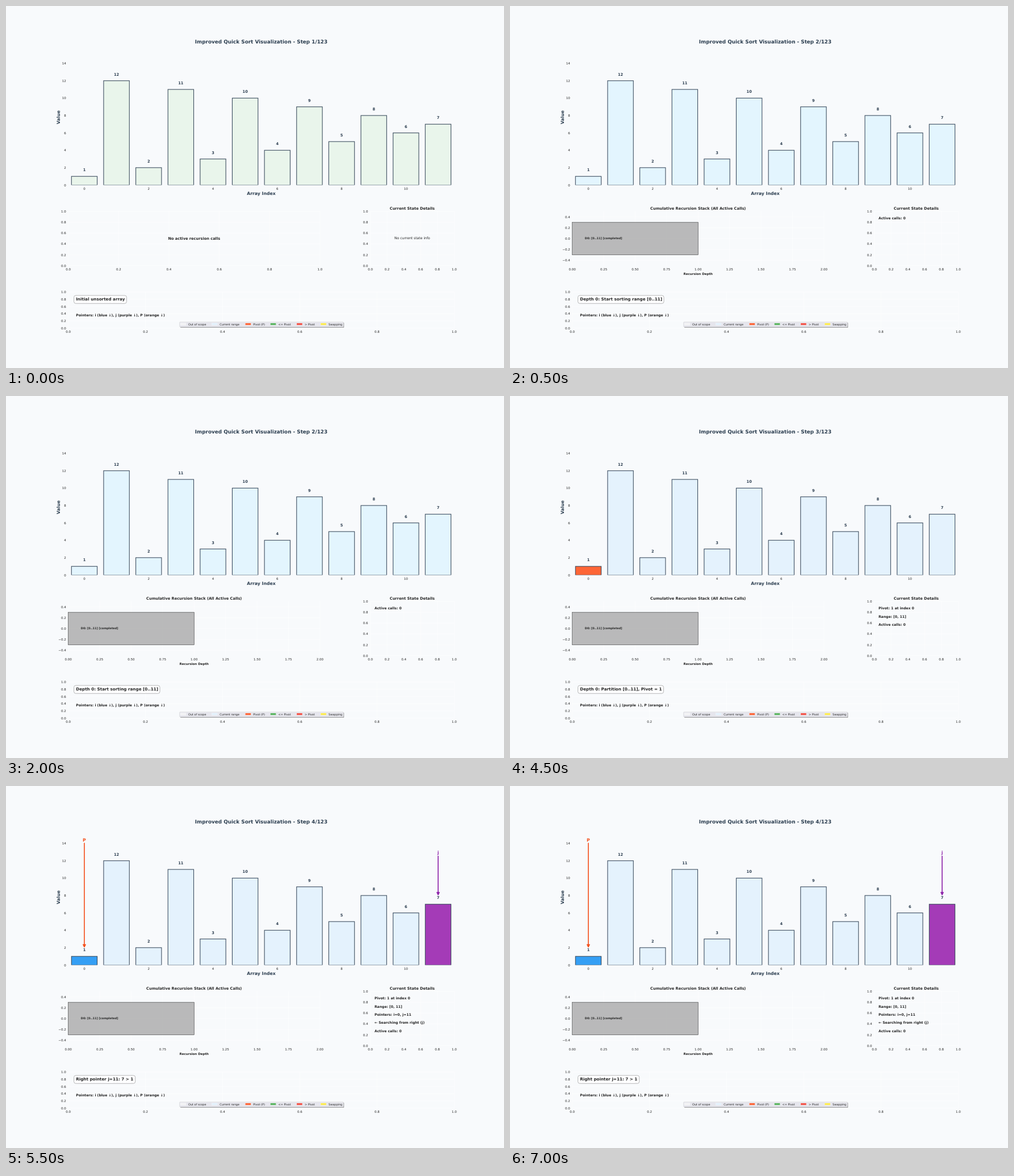
An HTML page that plays this animation: 877x638 px, repeating every 8000 ms.

```html
<!DOCTYPE html>
<html lang="en">
<head>
<meta charset="utf-8">
<title>Quick sort steps</title>
<style>
  html, body { margin: 0; width: 100%; height: 100%; overflow: hidden; background: #f8fafc; }
  svg { display: block; width: 877px; height: 638px; }
  text { font-family: "DejaVu Sans", sans-serif; fill: #262626; text-rendering: geometricPrecision; white-space: pre; }
</style>
</head>
<body>
<svg id="stage" viewBox="0 0 877 638" xmlns="http://www.w3.org/2000/svg"></svg>
<script>
const PT = 877 / 22 / 72;
const LOOP = 8000;
const INK = '#2c3e50';
const values = [1, 12, 2, 11, 3, 10, 4, 9, 5, 8, 6, 7];

// Plot areas
const main = { x: 109.63, y: 76.56, w: 679.67, h: 239 };
const stack = { x: 109.63, y: 362.02, w: 443.27, h: 95.6 };
const state = { x: 641.54, y: 362.02, w: 147.76, h: 95.6 };
const info = { x: 109.63, y: 504.09, w: 679.67, h: 63.73 };
const unitY = main.h / 15.6, unitX = main.w / 12;
const barX = i => main.x + (i + 0.5) * unitX;
const barY = v => main.y + main.h - v * unitY;

const steps = [
  { at: 0, bar: '#e8f5e9', message: 'Initial unsorted array', boxEnd: 212.4 },
  { at: 500, bar: '#e1f5fe', message: 'Depth 0: Start sorting range [0..11]', boxEnd: 271,
    details: [] },
  { at: 3000, bar: '#e3f2fd', message: 'Depth 0: Partition [0..11], Pivot = 1', boxEnd: 270.5,
    marked: { 0: '#ff5722' },
    details: ['Pivot: 1 at index 0', 'Range: [0, 11]'] },
  { at: 5500, bar: '#e3f2fd', message: 'Right pointer j=11: 7 > 1', boxEnd: 227.7,
    marked: { 0: '#2196f3', 11: '#9c27b0' },
    details: ['Pivot: 1 at index 0', 'Range: [0, 11]', 'Pointers: i=0, j=11', '← Searching from right (j)'],
    pointers: [
      { name: 'P', index: 0, base: 98, from: 100.2, tip: 284.8, color: '#f4511e' },
      { name: 'j', index: 11, base: 120.2, from: 123, tip: 192.8, color: '#8e24aa' }
    ] }
];

const svg = document.getElementById('stage');

function add(parent, tag, attrs, content) {
  const el = document.createElementNS('http://www.w3.org/2000/svg', tag);
  for (const key in attrs) el.setAttribute(key, attrs[key]);
  if (content !== undefined) el.textContent = content;
  parent.appendChild(el);
  return el;
}

function label(parent, str, x, y, size, attrs) {
  return add(parent, 'text', { x, y, 'font-size': size * PT, ...attrs }, str);
}

const bold = { 'font-weight': 700 };
const mid = { 'text-anchor': 'middle' };
const boldMid = { ...bold, ...mid };
const heading = { ...boldMid, style: 'fill:' + INK };

const xTick = (g, str, x, bottom) => label(g, str, x, bottom + 8.1, 10, mid);
const yTick = (g, str, y) => (x => label(g, str, x - 3.9, y + 2.02, 10, { 'text-anchor': 'end' }));

// Ticks with white grid lines; each axis is { n, lo, hi, from, step, digits }
function grid(g, box, xs, ys) {
  const line = d => add(g, 'path', { d, stroke: '#fff', 'stroke-width': PT, fill: 'none' });
  const tick = (a, i) => {
    const v = a.from + i * a.step;
    return { str: v.toFixed(a.digits).replace('-', '−'), k: (v - a.lo) / (a.hi - a.lo) };
  };
  for (let i = 0; i < xs.n; i++) {
    const { str, k } = tick(xs, i), x = box.x + k * box.w;
    line(`M${x} ${box.y}v${box.h}`);
    xTick(g, str, x, box.y + box.h);
  }
  for (let i = 0; i < ys.n; i++) {
    const { str, k } = tick(ys, i), y = box.y + (1 - k) * box.h;
    line(`M${box.x} ${y}h${box.w}`);
    yTick(g, str, y)(box.x);
  }
}

const unit = { n: 6, lo: 0, hi: 1, from: 0, step: 0.2, digits: 1 };
const depth = { n: 9, lo: 0, hi: 2, from: 0, step: 0.25, digits: 2 };
const level = { n: 5, lo: -0.5, hi: 0.5, from: -0.4, step: 0.2, digits: 1 };

function drawMain(g, s, n) {
  label(g, `Improved Quick Sort Visualization - Step ${n + 1}/123`, 449.46, 65.5, 16, heading);
  const bars = add(g, 'g', { 'clip-path': 'url(#plot)' });
  values.forEach((v, i) => {
    add(bars, 'rect', {
      x: barX(i) - 0.4 * unitX, y: barY(v), width: 0.8 * unitX, height: v * unitY,
      fill: (s.marked || {})[i] || s.bar, 'fill-opacity': 0.9,
      stroke: INK, 'stroke-opacity': 0.9, 'stroke-width': 2 * PT
    });
    label(g, v, barX(i), barY(v + 0.5) - 1.4, 12, heading);
    if (i % 2 === 0) xTick(g, i, barX(i), barY(0));
  });
  for (let v = 0; v <= 14; v += 2) yTick(g, v, barY(v))(main.x);
  label(g, 'Array Index', 449.46, 333.3, 14, heading);
  label(g, 'Value', 0, 0, 14, { ...heading, transform: 'translate(94.8 196.1) rotate(-90)' });
  for (const p of s.pointers || []) {
    const x = barX(p.index);
    label(g, p.name, x, p.base, 14, { ...boldMid, style: 'fill:' + p.color });
    add(g, 'path', { d: `M${x} ${p.from}V${p.tip - 4}`, stroke: p.color, 'stroke-width': 3 * PT });
    add(g, 'path', {
      d: `M${x} ${p.tip - 0.9}l-2.2 -4.4h4.4z`, fill: p.color,
      stroke: p.color, 'stroke-width': 1.4, 'stroke-linejoin': 'round'
    });
  }
}

function drawStack(g, s) {
  const cx = stack.x + stack.w / 2, cy = stack.y + stack.h / 2;
  if (!s.details) {
    grid(g, stack, unit, unit);
    label(g, 'No active recursion calls', cx, cy + 1.75, 12, boldMid);
    return;
  }
  grid(g, stack, depth, level);
  add(g, 'rect', {
    x: stack.x, y: cy - 0.3 * stack.h, width: stack.w / 2, height: 0.6 * stack.h,
    fill: '#9e9e9e', 'fill-opacity': 0.7, stroke: '#000', 'stroke-opacity': 0.7, 'stroke-width': 0.65
  });
  label(g, 'D0: [0..11] [completed]', stack.x + 0.05 * stack.w, cy + 1.3, 9, bold);
  label(g, 'Cumulative Recursion Stack (All Active Calls)', cx, 358.7, 12, boldMid);
  label(g, 'Recursion Depth', cx, 473.6, 10, boldMid);
}

function drawState(g, s) {
  const cx = state.x + state.w / 2;
  grid(g, state, unit, unit);
  label(g, 'Current State Details', cx, 358.7, 12, boldMid);
  if (!s.details) {
    label(g, 'No current state info', cx, 411.4, 11, mid);
    return;
  }
  [...s.details, 'Active calls: 0'].forEach((str, i) =>
    label(g, str, state.x + 0.05 * state.w, 376.2 + i * 0.15 * state.h, 11, bold));
}

function drawInfo(g, s) {
  grid(g, info, unit, unit);
  add(g, 'rect', {
    x: 119.6, y: 510.1, width: s.boxEnd - 119.6, height: 14.2, rx: 3.4,
    fill: '#fff', 'fill-opacity': 0.9, stroke: '#808080', 'stroke-width': PT
  });
  label(g, s.message, 123.2, 519, 13, bold);
  label(g, 'Pointers: i (blue ↓), j (purple ↓), P (orange ↓)', 123.2, 547.1, 11, bold);
}

function drawLegend(g) {
  const box = { x: 305.8, y: 556.9, width: 288.4, height: 8.9, rx: 1 };
  add(g, 'rect', { ...box, x: box.x + 1.1, y: box.y + 1.1, fill: '#464649', opacity: 0.5 });
  add(g, 'rect', { ...box, fill: '#eaeaf2', 'fill-opacity': 0.95, stroke: '#ccc', 'stroke-width': PT });
  [
    ['Out of scope', 321, '#f5f5f5'],
    ['Current range', 376.3, '#e3f2fd'],
    ['Pivot (P)', 435.3, '#ff5722'],
    ['<= Pivot', 479.5, '#4caf50'],
    ['> Pivot', 525.9, '#f44336'],
    ['Swapping', 568, '#ffeb3b']
  ].forEach(([str, x, fill]) => {
    add(g, 'rect', {
      x: x - 13.95, y: 558.9, width: 9.97, height: 3.5,
      fill, 'fill-opacity': 0.9, stroke: '#fff', 'stroke-width': 0.3
    });
    label(g, str, x, 562.5, 9);
  });
}

const clip = add(add(svg, 'defs', {}), 'clipPath', { id: 'plot' });
add(clip, 'rect', { x: main.x, y: main.y, width: main.w, height: main.h });

const scenes = steps.map((s, n) => {
  const g = add(svg, 'g', { visibility: 'hidden' });
  drawMain(g, s, n);
  drawStack(g, s);
  drawState(g, s);
  drawInfo(g, s);
  drawLegend(g);
  return g;
});

function render(ms) {
  const t = ms % LOOP;
  const now = steps.filter(s => s.at <= t).length - 1;
  scenes.forEach((g, i) => g.setAttribute('visibility', i === now ? 'visible' : 'hidden'));
}

const start = performance.now();
function tick() {
  render(performance.now() - start);
  requestAnimationFrame(tick);
}
tick();
</script>
</body>
</html>
```
